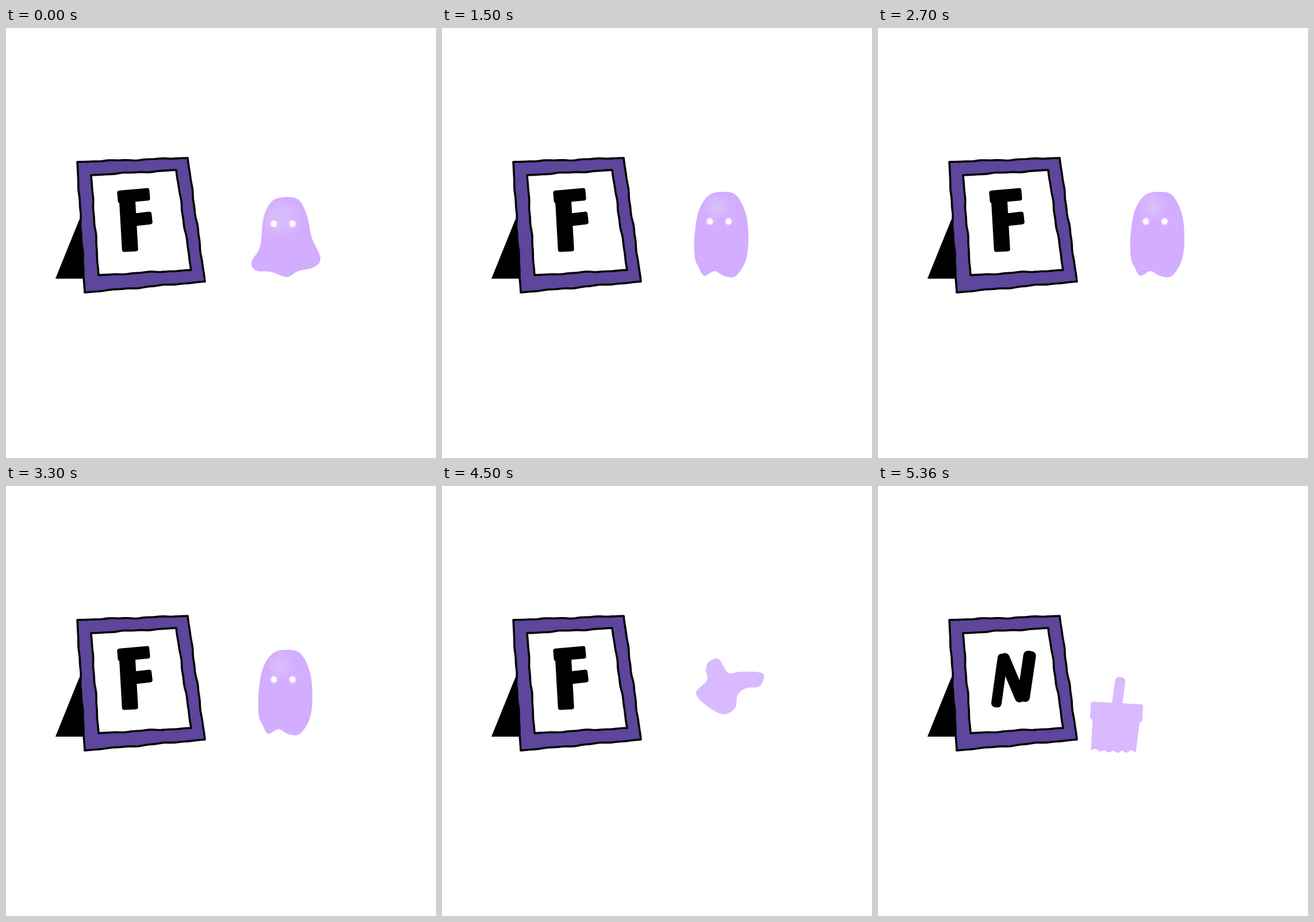
Animation, 748 px wide and 748 px high, one loop 5990 ms. Source, as an HTML page with a canvas:

```html
<!DOCTYPE html>
<html lang="en">
<head>
<meta charset="utf-8">
<title>Shape-shifting ghost</title>
<style>
html, body { margin: 0; width: 100%; height: 100%; overflow: hidden; background: #fff; }
canvas { display: block; width: 100vw; height: 100vh; }
</style>
</head>
<body>
<canvas id="stage" width="748" height="748"></canvas>
<script>
const ctx = document.getElementById('stage').getContext('2d');
const LOOP = 5990;
const INK = '#040404', PURPLE = '#5d469b', LILAC = '#d3adff', PALE = '#d9b9ff';

const mix = (a, b, k) => a + (b - a) * k;
const blend = (a, b, k) => a.map((p, i) => p.map((v, j) => mix(v, b[i][j], k)));
const noise = i => Math.abs(Math.sin(i * 12.9898) * 43758.5453) % 1;

// Key points of the three soft bodies, counter-clockwise from the top.
const wide = [[488, 294], [463, 301], [448, 330], [442, 380], [427, 407], [435, 422], [460, 424],
  [489, 433], [508, 423], [536, 416], [547, 400], [532, 365], [524, 328], [510, 300]];
const tall = [[487, 285], [463, 292], [446, 320], [439, 365], [440, 400], [446, 415], [456, 431],
  [474, 423], [490, 431], [510, 432], [527, 408], [533, 372], [529, 325], [512, 291]];
const blob = [[481, 301], [464, 306], [459, 320], [461, 338], [442, 360], [460, 382], [489, 397],
  [510, 386], [514, 364], [528, 352], [553, 348], [558, 326], [520, 323], [498, 325]];
const squashY = y => 452 - (433 - y) * 0.8;
const squat = wide.map(([x, y]) => [x, squashY(y)]);

const outer = [[124, 233], [316, 226], [346, 441], [137, 460]];
const inner = [[148, 256], [296, 247], [322, 421], [161, 430]];

function fillPolygon(points, color) {
  ctx.beginPath();
  points.forEach(p => ctx.lineTo(...p));
  ctx.closePath();
  ctx.fillStyle = color;
  ctx.fill();
}

// Closed Catmull-Rom curve through all points.
function curve(points) {
  const n = points.length, at = i => points[(i + n) % n], path = new Path2D();
  path.moveTo(...points[0]);
  for (let i = 0; i < n; i++) {
    const [a, b, c, d] = [at(i - 1), at(i), at(i + 1), at(i + 2)];
    path.bezierCurveTo(b[0] + (c[0] - a[0]) / 6, b[1] + (c[1] - a[1]) / 6,
      c[0] - (d[0] - b[0]) / 6, c[1] - (d[1] - b[1]) / 6, c[0], c[1]);
  }
  path.closePath();
  return path;
}

// Thick straight stroke with corners of the given radius.
function bar(x0, y0, x1, y1, width, radius, color) {
  ctx.save();
  ctx.translate(x0, y0);
  ctx.rotate(Math.atan2(y1 - y0, x1 - x0));
  ctx.beginPath();
  ctx.roundRect(0, -width / 2, Math.hypot(x1 - x0, y1 - y0), width, radius);
  ctx.fillStyle = color;
  ctx.fill();
  ctx.restore();
}

// Pen outline of a quadrilateral, each side slightly wavy.
function inkOutline(corners) {
  ctx.beginPath();
  corners.forEach(([x0, y0], i) => {
    const [x1, y1] = corners[(i + 1) % 4], length = Math.hypot(x1 - x0, y1 - y0);
    for (let s = 0; s <= length; s += 4) {
      const k = s / length;
      const wave = Math.sin(Math.PI * k) * (0.8 * Math.sin(s / 13 + i) + 0.4 * Math.sin(s / 5));
      ctx.lineTo(mix(x0, x1, k) - wave * (y1 - y0) / length, mix(y0, y1, k) + wave * (x1 - x0) / length);
    }
  });
  ctx.closePath();
  ctx.strokeStyle = INK;
  ctx.lineWidth = 3.6;
  ctx.stroke();
}

function drawFrame() {
  fillPolygon([[128, 332], [86, 436], [136, 436]], '#000');
  fillPolygon(outer, PURPLE);
  fillPolygon(inner, '#fff');
  inkOutline(outer);
  inkOutline(inner);
}

function drawF() {
  bar(210, 284, 216, 389, 28, 4, '#000');
  bar(194, 294, 250, 289, 22, 4, '#000');
  bar(212, 335, 254, 330, 22, 4, '#000');
}

function drawN() {
  bar(218, 292, 205, 385, 18, 7, '#000');
  bar(216, 292, 251, 375, 20, 8, '#000');
  bar(265, 287, 252, 375, 22, 8, '#000');
}

function drawGhost(body, eyeY, glowY, glow) {
  const path = curve(body);
  const light = ctx.createRadialGradient(478, glowY, 0, 478, glowY, glow);
  light.addColorStop(0, '#d9bffb');
  light.addColorStop(0.5, '#d7b8fc');
  light.addColorStop(1, LILAC);
  ctx.fillStyle = light;
  ctx.fill(path);
  ctx.save();
  ctx.shadowColor = ctx.fillStyle = '#fff';
  ctx.shadowBlur = 4;
  for (const x of [466, 498.5]) {
    ctx.beginPath();
    ctx.ellipse(x, eyeY, 4.8, 5.3, 0, 0, 7);
    ctx.fill();
  }
  ctx.restore();
}

const ghostBetween = k =>
  drawGhost(blend(wide, tall, k), mix(340.5, 336.5, k), mix(332, 312, k), mix(38, 26, k));

function drawBlob(points) {
  ctx.fillStyle = PALE;
  ctx.fill(curve(points));
}

const soft = { half: 50, thick: 23, grip: 24, lean: 14, spread: 32, spike: 13 };
const firm = { half: 45.5, thick: 31, grip: 18, lean: 2, spread: 39, spike: 5 };

// Brush with hairs pointing up at turn 0; x, y is the middle of its collar.
function drawBrush(x, y, turn, { half, thick, grip, lean, spread, spike }) {
  const hairs = [[-42, 0]], tips = 5;
  for (let i = 0; i <= tips * 2; i++) {
    const notch = i % 2 ? spike * (0.6 + 0.5 * noise(i)) : 0;
    hairs.push([lean + spread * (i / tips - 1), notch - 69 - spike / 2 * Math.sin(Math.PI * i / tips / 2)]);
  }
  hairs.push([41, 0]);
  ctx.save();
  ctx.translate(x, y);
  ctx.rotate(turn * Math.PI / 180);
  fillPolygon(hairs, PALE);
  bar(-half, 0, half, 0, thick, 4, PALE);
  bar(1, 0, lean / 2 - 5, 61, grip, 8, PALE);
  ctx.restore();
}

// Flight towards the top right corner of the frame.
const fly = k => drawBrush(mix(492, 340, k), mix(335, 278, k), mix(-87, -25, k), soft);

// Start time and drawing of each held pose after the bobbing ends.
const poses = [
  [4200, () => drawGhost(squat, squashY(340.5), squashY(332), 34)],
  [4370, () => drawBlob(blend(squat, blob, 0.55))],
  [4500, () => drawBlob(blob)],
  [4630, () => fly(0)],
  [4730, () => fly(1 / 3)],
  [4830, () => fly(2 / 3)],
  [4930, () => fly(1)],
  [5030, () => drawBrush(221, 318, -50, soft)],
  [5130, () => drawBrush(250, 362, -65, soft)],
  [5230, () => drawBrush(393, 418, 183, firm)],
  [5360, () => drawBrush(415, 393, 183, firm)]
];

function drawBob(t) {
  const beat = Math.floor(t / 300) % 2;
  ghostBetween(t % 300 < 170 ? beat : 0.5);
}

function draw(t) {
  ctx.fillStyle = '#fff';
  ctx.fillRect(0, 0, 748, 748);
  ctx.lineJoin = 'round';
  drawFrame();
  if (t < 5130) drawF();
  else drawN();
  const pose = poses.filter(([start]) => t >= start).pop();
  if (pose) pose[1]();
  else drawBob(t);
}

function tick() {
  draw(performance.now() % LOOP);
  requestAnimationFrame(tick);
}
tick();
</script>
</body>
</html>
```
